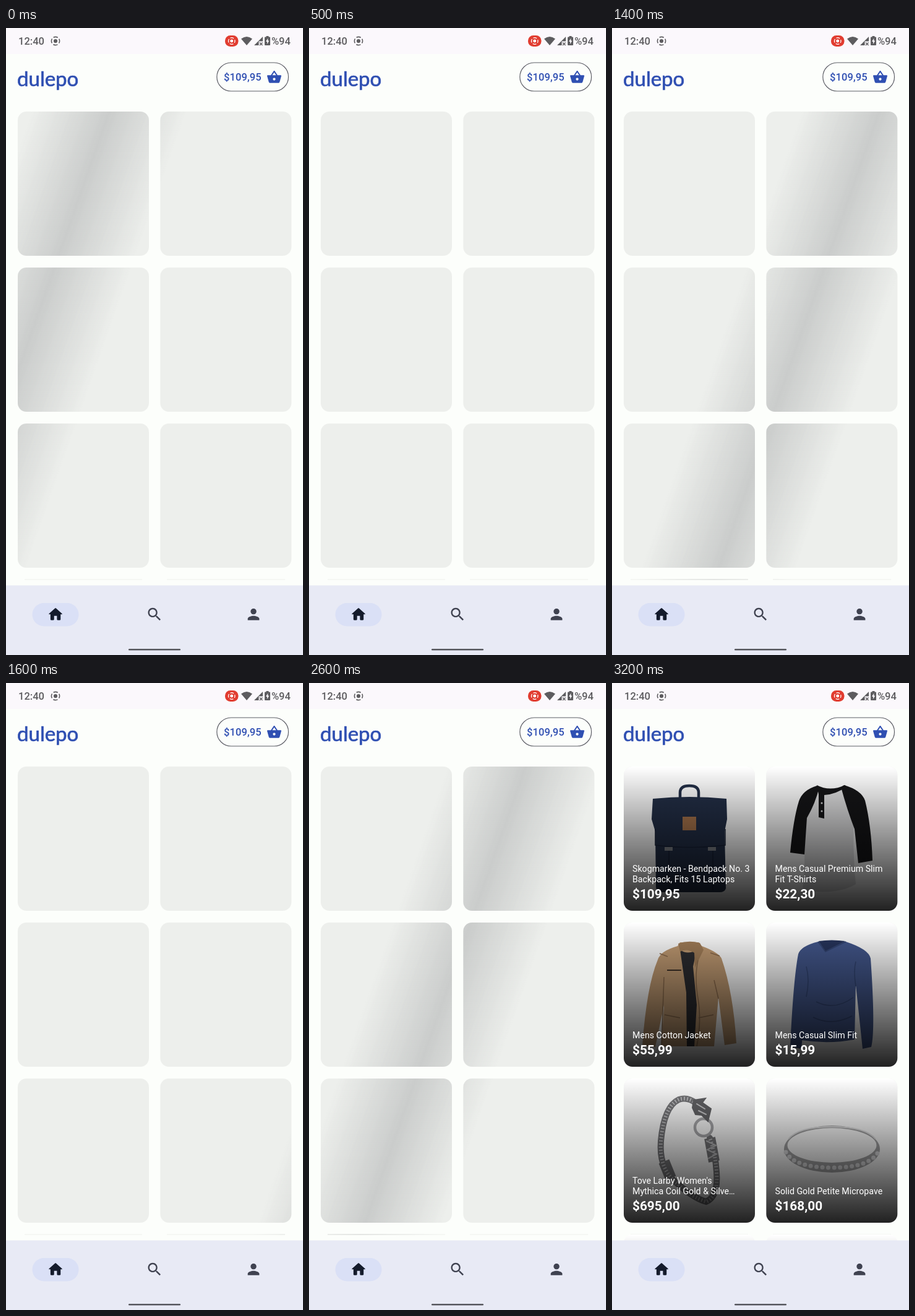
Recreate the animation shown at these times as an HTML page. Size 480 px wide and 1013 px high, loop 6.7 s.

```html
<!DOCTYPE html>
<html lang="en">
<head>
<meta charset="utf-8">
<title>Shop loading</title>
<style>
  html, body { margin: 0; height: 100%; overflow: hidden; background: #fcfefb; }
  svg { display: block; width: 100vw; height: 100vh; }
  text { font-family: Roboto, sans-serif; }
  .status { font-size: 16.5px; font-weight: 500; fill: #5d5c5f; }
  .brand { font: 33px Lato, sans-serif; fill: #2f4fb2; stroke: #2f4fb2; stroke-width: .7; stroke-linejoin: round; }
  .total { font-size: 16.5px; font-weight: 500; letter-spacing: .12px; fill: #2f4fb2; }
  .title { font-size: 14.2px; fill: #fff; }
  .price { font-size: 20.8px; font-weight: 700; fill: #fff; }

  /* One step is 100 ms of the 6700 ms loop */
  .band { animation: sweep 6.7s infinite; }
  .products { animation: reveal 6.7s step-end infinite; }
  @keyframes sweep {
    0% { transform: translateX(167px); animation-timing-function: steps(5); }
    7.46% { transform: translateX(1067px); animation-timing-function: step-end; }
    16.41% { transform: translateX(-108px); animation-timing-function: steps(6); }
    25.37% { transform: translateX(972px); animation-timing-function: step-end; }
    35.82% { transform: translateX(-10px); animation-timing-function: steps(3); }
    40.29% { transform: translateX(530px); animation-timing-function: step-end; }
    40.291%, 100% { transform: translateX(1200px); animation-timing-function: step-end; }
  }
  @keyframes reveal {
    0% { opacity: 0; }
    43.28% { opacity: .34; }
    44.77% { opacity: .67; }
    46.26% { opacity: .9; }
    47.76%, 100% { opacity: 1; }
  }
</style>
</head>
<body>
<svg viewBox="0 0 480 1013" preserveAspectRatio="none">
  <defs>
    <rect id="tile" width="212" height="233" rx="14"/>
    <g id="grid">
      <use href="#tile" x="19" y="135"/><use href="#tile" x="249.3" y="135"/>
      <use href="#tile" x="19" y="387"/><use href="#tile" x="249.3" y="387"/>
      <use href="#tile" x="19" y="639"/><use href="#tile" x="249.3" y="639"/>
    </g>
    <g id="nextRow"><use href="#tile" x="19" y="891"/><use href="#tile" x="249.3" y="891"/></g>
    <mask id="skeleton" maskUnits="userSpaceOnUse" x="0" y="0" width="480" height="900">
      <g fill="#fff">
        <use href="#grid"/>
        <path d="M30 890.5h190v1H30zM260 890.5h191v1H260z"/>
      </g>
    </mask>
    <linearGradient id="glow">
      <stop stop-color="#cacccb" stop-opacity="0"/>
      <stop offset=".5" stop-color="#cacccb"/>
      <stop offset="1" stop-color="#cacccb" stop-opacity="0"/>
    </linearGradient>
    <linearGradient id="shade" x2="0" y2="1">
      <stop stop-opacity="0"/>
      <stop offset="1" stop-opacity=".87"/>
    </linearGradient>
    <g id="record">
      <circle r="3.1"/>
      <circle r="6.6" fill="none" stroke="currentColor" stroke-width="1.6" stroke-dasharray="7.4 2.97" stroke-dashoffset="3.7"/>
    </g>
  </defs>

  <rect width="480" height="1013" fill="#fcfefb"/>

  <!-- Status bar -->
  <rect width="480" height="42" fill="#fbf8fc"/>
  <text class="status" x="20" y="27">12:40</text>
  <use href="#record" x="80" y="21" fill="#5d5c5f" color="#5d5c5f"/>
  <rect x="354" y="12" width="21.5" height="18" rx="8.5" fill="#e13c30"/>
  <use href="#record" transform="translate(364.7 21) scale(.8)" fill="#fff" color="#fff"/>
  <g fill="#5d5c5f">
    <path d="M380 17.6Q389 10.4 398 17.6L389 28z"/>
    <path d="M401 28L415 14V21.5H408.5V28z"/>
    <path d="M410 23.5l4.5 4.5m0-4.5l-4.5 4.5" stroke="#5d5c5f" stroke-width="1.4"/>
    <path d="M420.5 14.5V13h4v1.500h1.500q1 0 1 1V27q0 1-1 1h-7q-1 0-1-1V15.500q0-1 1-1z"/>
    <path d="M423.300 16.500l-3.300 5.500h2v4l3.300-5.500h-2z" fill="#fbf8fc"/>
  </g>
  <text class="status" x="429" y="27">%94</text>

  <!-- Header -->
  <text class="brand" x="18" y="94">dulepo</text>
  <rect x="340.800" y="56" width="115.700" height="46" rx="23" fill="none" stroke="#5f6068" stroke-width="1.2"/>
  <text class="total" x="352" y="85">$109,95</text>
  <path transform="translate(421 67) scale(1.04)" fill="#2f4fb2" d="M17.210 9l-4.380-6.560c-.19-.28-.51-.42-.83-.42-.32 0-.64.14-.83.43L6.790 9H2c-.55 0-1 .45-1 1 0 .09.01.18.04.27l2.540 9.270c.23.84 1 1.460 1.920 1.460h13c.92 0 1.690-.62 1.930-1.460l2.540-9.270L23 10c0-.55-.45-1-1-1h-4.790zM9 9l3-4.400L15 9H9zm3 8c-1.100 0-2-.9-2-2s.9-2 2-2 2 .9 2 2-.9 2-2 2z"/>

  <!-- Loading tiles -->
  <g mask="url(#skeleton)">
    <rect width="480" height="900" fill="#edefec"/>
    <g class="band">
      <rect x="-125" width="250" height="765" fill="url(#glow)" transform="matrix(1 0 -.352 1 0 135)"/>
    </g>
  </g>

  <!-- Products -->
  <g class="products">
    <g fill="#fff"><use href="#grid"/><use href="#nextRow"/></g>

    <g fill="#232f47">
      <path d="M110 188v-11q0-11 15-11t15 11v11" fill="none" stroke="#232f47" stroke-width="4.500"/>
      <path d="M66 187Q125 181 185 187L186 220 182 240 184 332Q182 338 174 338H79Q72 338 71 330L70 240 64 220z"/>
      <path d="M70 236V262Q125 269 183 262V236M92 266V335M163 266V335" fill="none" stroke="#172136" stroke-width="1.500"/>
      <path d="M85 265h13v6H85zM155 265h13v6h-13z" fill="#7f8389"/>
      <rect x="114" y="216" width="22" height="22" fill="#a8744c"/>
    </g>

    <g fill="#151517">
      <path d="M330 167Q353 180 377 165L392 210Q388 260 394 325 364 343 308 335 315 285 307 215z" fill="#dfdfe0"/>
      <path d="M331 166Q308 173 302 191 293 220 288 274L311 277 315 218Q329 194 335 168z"/>
      <path d="M375 165Q403 173 409 190 419 230 421 287L398 291 392 236Q380 205 370 168z"/>
      <path d="M331 165Q352 176 377 165L378 168Q362 180 343 181V219L334 217V180z"/>
      <g fill="#ddd"><circle cx="339" cy="194" r="1.500"/><circle cx="339" cy="207" r="1.500"/></g>
    </g>

    <g fill="#c09a72">
      <path d="M106 425Q78 433 74 447 56 490 49 586L70 588 84 520 80 587H165L172 508 182 585 201 582Q196 500 177 445 172 435 145 425L140 419H110z"/>
      <path d="M110 431Q122 440 137 431L131 458 137 520 133 587H121L120 500z" fill="#2c2c30"/>
      <path d="M107 421Q124 415 142 420L148 431 134 460 133 436Q121 428 110 434z" fill="#a17d58"/>
      <path d="M89 464h23" stroke="#3d3027" stroke-width="2"/>
      <path d="M139 448Q133 475 139 510T137 587M84 475L80 587M165 480L172 510M85 536L110 541M140 541L164 536M77 437l13 5M159 436l15 5" fill="none" stroke="#8b6b4c" stroke-width="1.500"/>
    </g>

    <g fill="#42568a">
      <path d="M333 418Q305 425 301 438 293 480 288 588L306 591 314 507 306 577Q350 584 392 576L394 488 405 591 419 588Q426 560 418 445 415 430 378 418 355 414 333 418z"/>
      <path d="M334 417Q355 414 377 417L345 433z" fill="#26345b"/>
      <path d="M333 418L345 434 378 418M314 507Q320 480 314 458M394 490Q390 465 394 450M325 540Q355 555 388 538M330 515Q360 530 390 508" fill="none" stroke="#31436f" stroke-width="1.500"/>
    </g>

    <g fill="none" stroke-linecap="round">
      <g stroke="#77777a" stroke-width="10">
        <path id="chain" d="M136 679Q122 668 108 673 84 684 79 740 76 780 98 802 130 832 152 838 172 830 169 790 167 760 158 735"/>
        <path d="M158 735L165 773M84 773L95 800" stroke-width="18" stroke-linecap="butt"/>
      </g>
      <use href="#chain" stroke="#c8c8ca" stroke-width="6" stroke-dasharray="1.500 3.500" stroke-linecap="butt"/>
      <path d="M153 740l15 7-14 7 15 7-13 7" stroke="#bdbdbf" stroke-width="2"/>
      <circle cx="148" cy="718" r="14" stroke="#a9a9ac" stroke-width="4.500"/>
      <path d="M132 674L151 671 146 678 160 688 155 708 145 698 135 697 130 686z" fill="#626265" stroke="#626265" stroke-width="2"/>
      <path d="M137 680l13 8m-10 3l12 6" stroke="#c4c4c6" stroke-width="2"/>
    </g>

    <g>
      <path fill="#a5a5a6" fill-rule="evenodd" d="M278 753a77.500 38 0 0 1 155 0a77.500 38 0 0 1-155 0zM283.500 747a72 28 0 0 0 144 0a72 28 0 0 0-144 0z"/>
      <path d="M285 737Q300 717 355.500 717T426 737" fill="none" stroke="#e2e2e3" stroke-width="2"/>
      <path d="M281 758Q295 783 355.500 783T430 758" fill="none" stroke="#dedee0" stroke-width="7" stroke-dasharray="0 9.500" stroke-linecap="round"/>
    </g>

    <g fill="url(#shade)"><use href="#grid"/><use href="#nextRow"/></g>

    <g class="title">
      <text x="33" y="305">Skogmarken - Bendpack No. 3</text>
      <text x="33" y="322">Backpack, Fits 15 Laptops</text>
      <text x="263.500" y="305">Mens Casual Premium Slim</text>
      <text x="263.500" y="322">Fit T-Shirts</text>
      <text x="33" y="574">Mens Cotton Jacket</text>
      <text x="263.500" y="574">Mens Casual Slim Fit</text>
      <text x="33" y="809">Tove Larby Women's</text>
      <text x="33" y="826">Mythica Coil Gold &amp; Silve…</text>
      <text x="263.500" y="826">Solid Gold Petite Micropave</text>
    </g>
    <g class="price">
      <text x="33" y="348">$109,95</text><text x="263.500" y="348">$22,30</text>
      <text x="33" y="600">$55,99</text><text x="263.500" y="600">$15,99</text>
      <text x="33" y="852">$695,00</text><text x="263.500" y="852">$168,00</text>
    </g>
  </g>

  <!-- Navigation -->
  <rect y="900.500" width="480" height="112.500" fill="#e8eaf5"/>
  <rect x="42.500" y="929" width="75" height="37.500" rx="18.700" fill="#dae0f6"/>
  <path transform="translate(66 933.300) scale(1.170)" fill="#141b2c" d="M10 19v-5h4v5c0 .55.45 1 1 1h3c.55 0 1-.45 1-1v-7h1.700c.46 0 .68-.57.33-.87L12.670 3.600c-.38-.34-.96-.34-1.340 0l-8.360 7.530c-.34.3-.13.87.33.87H5v7c0 .55.45 1 1 1h3c.55 0 1-.45 1-1z"/>
  <g fill="#3f4250">
    <path transform="translate(226 933.300) scale(1.170)" d="M15.500 14h-.79l-.28-.27C15.410 12.590 16 11.110 16 9.500 16 5.910 13.090 3 9.500 3S3 5.910 3 9.500 5.910 16 9.500 16c1.610 0 3.090-.59 4.230-1.570l.27.28v.79l5 4.990L20.490 19l-4.990-5zm-6 0C7.010 14 5 11.990 5 9.500S7.010 5 9.500 5 14 7.010 14 9.500 11.990 14 9.500 14z"/>
    <path transform="translate(386 933.300) scale(1.170)" d="M12 12c2.210 0 4-1.790 4-4s-1.790-4-4-4-4 1.790-4 4 1.790 4 4 4zm0 2c-2.670 0-8 1.340-8 4v2h16v-2c0-2.660-5.330-4-8-4z"/>
  </g>
  <rect x="198" y="1003" width="84" height="2.600" rx="1.300" fill="#56575d"/>
</svg>
</body>
</html>
```
